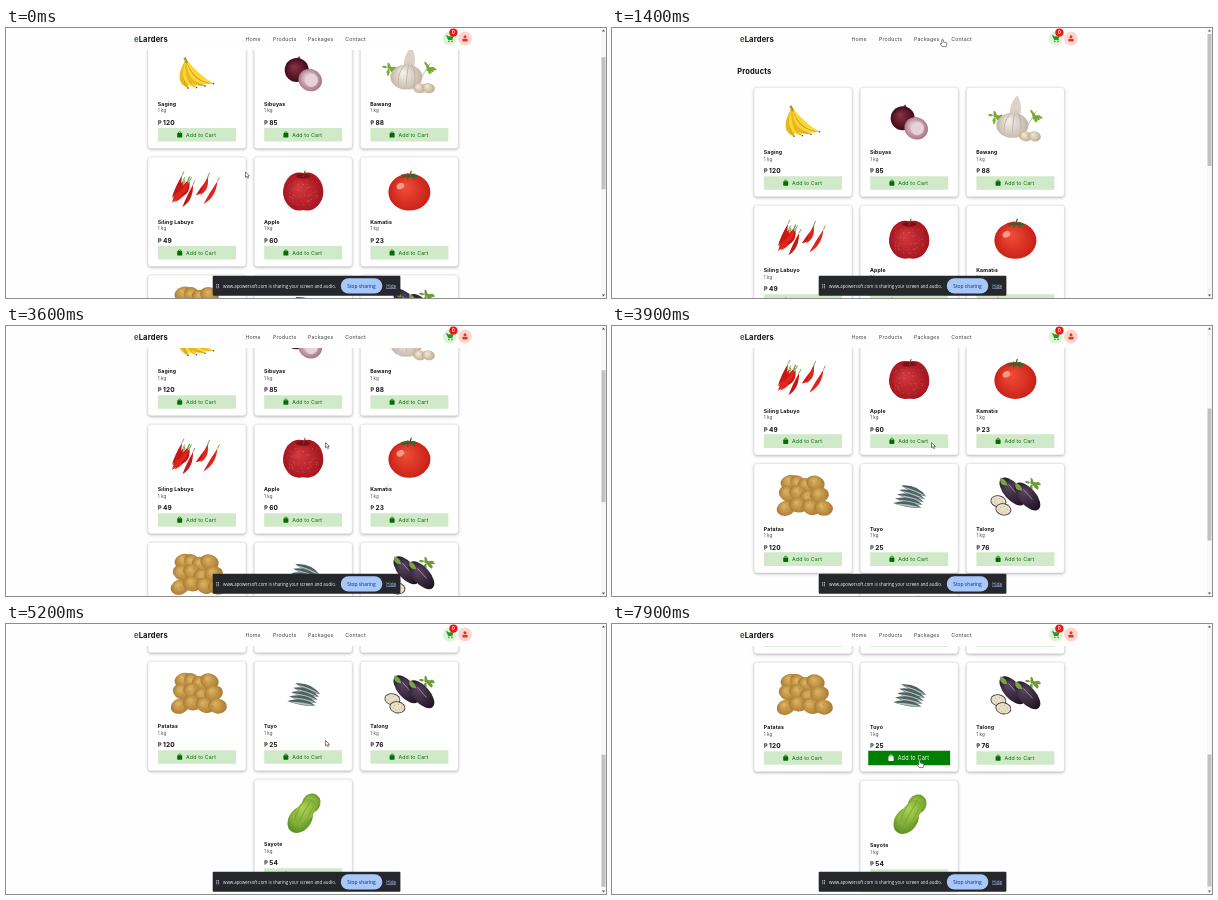
These frames come from a looping animation (600x270 px, 8 s). An HTML page with a canvas:

```html
<!DOCTYPE html>
<html lang="en">
<head>
<meta charset="utf-8">
<title>Grocery shop</title>
<style>
html, body { margin: 0; width: 100%; height: 100%; overflow: hidden; background: #fefefe; }
canvas { display: block; width: 600px; height: 270px; }
</style>
</head>
<body>
<canvas id="stage"></canvas>
<script>
const W = 600, H = 270, LOOP = 8000;
const canvas = document.getElementById('stage');
const dpr = window.devicePixelRatio || 1;
canvas.width = W * dpr;
canvas.height = H * dpr;
const g = canvas.getContext('2d');
const UI = 'Inter, sans-serif', SYS = '"Open Sans", sans-serif';
const INK = '#111', PAGE = '#fefefe', GREEN = '#0a800a';

// ---- timing ----

const clamp = v => Math.max(0, Math.min(1, v));
const smooth = v => v * v * (3 - 2 * v);
const easeOut = v => 1 - (1 - v) ** 3;
const span = (t, a, b) => clamp((t - a) / (b - a));

function scrollAt(t) {
  return 48.5 * (1 - easeOut(span(t, 0, 500)))
    + 157.5 * span(t, 3300, 3900)
    + 100.5 * easeOut(span(t, 3900, 4700))
    - span(t, 5600, 5700);
}

// Each move: start, end, target x, target y
const moves = [[150, 950, 330.5, 11], [1450, 2300, 255.5, 16.5],
  [3000, 3400, 319.5, 116.5], [7300, 7550, 307.5, 136]];

function cursorAt(t) {
  let x = 239.5, y = 144;
  for (const [a, b, tx, ty] of moves) {
    const k = smooth(span(t, a, b));
    x += (tx - x) * k;
    y += (ty - y) * k;
  }
  return [x, y];
}

// ---- drawing helpers ----

let seed = 1;
function rand(a, b) {
  seed = seed * 16807 % 2147483647;
  return a + (b - a) * seed / 2147483647;
}

function text(s, x, y, size, color, weight = 400, font = UI, align = 'left') {
  g.font = `${weight} ${size}px ${font}`;
  g.letterSpacing = font === UI ? '0.15px' : '0px';
  g.textAlign = align;
  g.fillStyle = color;
  g.fillText(s, x, y);
}

function rect(x, y, w, h, color, r = 0) {
  g.beginPath();
  g.roundRect(x, y, w, h, r);
  g.fillStyle = color;
  g.fill();
}

function oval(x, y, rx, ry, rot, color) {
  g.beginPath();
  g.ellipse(x, y, rx, ry, rot, 0, Math.PI * 2);
  g.fillStyle = color;
  g.fill();
}

const dot = (x, y, r, color) => oval(x, y, r, r, 0, color);

function ball(x, y, rx, ry, rot, light, dark) {
  const r = Math.max(rx, ry);
  const fill = g.createRadialGradient(x - r * .25, y - r * .3, 0, x, y, r);
  fill.addColorStop(0, light);
  fill.addColorStop(1, dark);
  oval(x, y, rx, ry, rot, fill);
}

// Tapered curved body between two points, bent towards (cx, cy)
function horn(x0, y0, cx, cy, x1, y1, w, color) {
  const len = Math.hypot(x1 - x0, y1 - y0);
  const nx = (y1 - y0) / len * w, ny = (x0 - x1) / len * w;
  g.beginPath();
  g.moveTo(x0, y0);
  g.quadraticCurveTo(cx + nx, cy + ny, x1, y1);
  g.quadraticCurveTo(cx - nx, cy - ny, x0, y0);
  g.fillStyle = color;
  g.fill();
}

function line(x0, y0, x1, y1, width, color) {
  g.beginPath();
  g.moveTo(x0, y0);
  g.lineTo(x1, y1);
  g.strokeStyle = color;
  g.lineWidth = width;
  g.stroke();
}

function outline(d, fill, stroke, width) {
  const path = new Path2D(d);
  g.fillStyle = fill;
  g.fill(path);
  if (!stroke) return;
  g.strokeStyle = stroke;
  g.lineWidth = width;
  g.stroke(path);
}

function leaves(x, y, n, r, color) {
  for (let i = 0; i < n; i++) {
    const a = rand(0, 6.3), d = rand(0, r);
    oval(x + Math.cos(a) * d, y + Math.sin(a) * d, 2.4, 1.1, a, color);
  }
}

// ---- produce, in card coordinates ----

function banana() {
  for (let i = 0; i < 4; i++) {
    const x = 40 + i * 8.5, y = 49 - i * i * .5;
    horn(38, 20, 33 + i * 4, 43, x, y, 9, i % 2 ? '#fbd636' : '#ebb91f');
    horn(38, 21, 33 + i * 4, 44, x, y, 1, '#c99a1b');
    dot(x, y, .8, '#5a4715');
  }
  line(36.5, 18.5, 39, 24, 2.4, '#b59425');
}

function onion() {
  horn(45, 17, 45, 21, 43, 27, 4, '#8c3c3f');
  ball(42.5, 31, 12, 12, 0, '#8b3444', '#3f0b18');
  ball(56, 41, 12, 11, .5, '#f0dfe4', '#a87487');
  oval(57, 41, 7, 7, .5, '#d8b9c5');
  oval(57, 41, 6.4, 6.4, .5, '#e6d2d9');
}

function garlic() {
  for (const side of [-1, 1]) {
    leaves(49 + side * 19, 29, 14, 6, '#74ab35');
    line(49 + side * 21, 24, 49 + side * 12, 38, .6, '#74ab35');
  }
  horn(51, 8, 49, 22, 47, 42, 11, '#dcd3c8');
  ball(46, 38, 16, 12.5, 0, '#f7f2ea', '#bfb3a5');
  for (let i = -1; i < 2; i++) horn(49, 22, 46 + i * 12, 34, 46 + i * 7, 49, .8, '#b9aca0');
  for (const x of [59, 68]) ball(x, 49, 6.5, 5, .2, '#f5eddc', '#bba98c');
}

function chili() {
  for (let i = 0; i < 12; i++) {
    const x = rand(34, 70), y = rand(17, 28);
    const ex = x + rand(-18, i % 3 ? -4 : 16), ey = rand(36, 50);
    line(x + 2, y - 4, x, y, .9, '#6d9c3c');
    horn(x, y, (x + ex) / 2 + 2, (y + ey) / 2 + 3, clampX(ex), ey, 4, i % 2 ? '#e0251d' : '#c31813');
  }
}

const clampX = x => Math.max(24, Math.min(74, x));

function apple() {
  for (const x of [45, 53]) ball(x, 34.5, 16, 19, 0, '#d43b3f', '#a3141f');
  ball(49, 36, 20, 17, 0, '#d43b3f', '#a3141f');
  oval(49, 19, 7, 2.4, 0, '#7e0f18');
  line(49, 20, 51, 13.5, 1, '#6a451f');
  for (let i = 0; i < 60; i++) dot(rand(35, 63), rand(24, 48), .35, '#e98079');
}

function tomato() {
  ball(49, 35, 21, 18.5, 0, '#f0503a', '#c81f16');
  for (let i = 0; i < 7; i++) {
    const a = i * .9, x = 49 + Math.cos(a) * 10, y = 19.5 + Math.sin(a) * 4;
    horn(49, 19, (49 + x) / 2, 18.5, x, y, 1.8, '#37642a');
  }
  line(49, 19, 51, 13.5, 1.2, '#37642a');
  oval(40, 29, 4, 3, -.5, '#f99a85');
}

function potatoes() {
  for (let row = 0; row < 3; row++)
    for (let i = 0; i < 4; i++) {
      const x = 34 + i * 10.5 + (row - 1) * (i - 1) * 2, y = 21 + row * 10.5 + rand(-2, 3);
      ball(x, y, 9.5, 7.5, rand(-.4, .9), '#dfb662', '#a87932');
      for (let k = 0; k < 3; k++) dot(x + rand(-5, 5), y + rand(-4, 4), .4, '#94682b');
    }
}

function fish() {
  for (let i = 0; i < 5; i++) {
    const x = 41 - i * 2, y = 22 + i * 4.4, ex = 66 - i * 1.2, ey = 33 + i * 2.8;
    const mx = (x + ex) / 2 + 1, my = (y + ey) / 2 - 2;
    horn(x, y, mx, my, ex, ey, 5.5, '#4d6163');
    horn(x, y + .8, mx, my + 2, ex, ey, 2, '#b5c0b9');
  }
}

function eggplant() {
  leaves(67, 20, 14, 6, '#6d9a38');
  for (let i = 0; i < 2; i++) {
    const x = 46 + i * 15, y = 28 + i * 5;
    ball(x, y, 17, 8.5, .85, '#5a4560', '#1d1220');
    horn(x - 12, y - 14, x - 10, y - 9, x - 5, y - 6, 5, '#7da348');
    line(x - 4, y - 7, x + 5, y + 3, 1, '#9a8aa0');
  }
  for (let i = 0; i < 2; i++) {
    const x = 32 + i * 5, y = 38 + i * 8;
    oval(x, y, 8, 6, .2, '#3d2440');
    oval(x, y, 7.2, 5.2, .2, '#e6e0c4');
    for (let k = 0; k < 6; k++) dot(x + Math.cos(k) * 4, y + Math.sin(k) * 3, .5, '#b1a572');
  }
}

function sayote() {
  ball(57, 24, 9, 10, .6, '#aed04f', '#699a2a');
  ball(46, 40, 15, 11, -.9, '#a9cd4c', '#588c24');
  ball(51, 32, 14, 8.5, -.95, '#b1d354', '#7cab34');
  for (let i = -1; i < 2; i++)
    horn(59 + i * 3, 18 + i * 3, 50 + i * 7, 31 + i * 4, 42 + i * 4, 48 + i, .7, '#6c9d2c');
}

const goods = [['Saging', 120, banana], ['Sibuyas', 85, onion], ['Bawang', 88, garlic],
  ['Siling Labuyo', 49, chili], ['Apple', 60, apple], ['Kamatis', 23, tomato],
  ['Patatas', 120, potatoes], ['Tuyo', 25, fish], ['Talong', 76, eggplant], ['Sayote', 54, sayote]];

// ---- page ----

function mix(a, b, k) {
  return `rgb(${a.map((v, i) => Math.round(v + (b[i] - v) * k))})`;
}

function button(hover) {
  const color = mix([0, 110, 0], [255, 255, 255], hover);
  g.save();
  g.translate(49, 95.7);
  g.scale(1 + .05 * hover, 1 + .05 * hover);
  rect(-39, -6.8, 78, 13.6, mix([208, 233, 200], [0, 128, 0], hover));
  rect(-19.8, -1.7, 5, 4.5, color, .7);
  g.beginPath();
  g.arc(-17.3, -1.6, 1.4, Math.PI, 0);
  g.strokeStyle = color;
  g.lineWidth = .7;
  g.stroke();
  text('Add to Cart', -11, 2, 5.25, color);
  g.restore();
}

function card(x, y, [name, price, art], hover) {
  g.save();
  g.translate(x, y);
  g.save();
  g.shadowColor = 'rgba(0,0,0,.3)';
  g.shadowBlur = 3 * dpr;
  g.shadowOffsetY = dpr;
  rect(0, 0, 98, 109.5, '#fff', 3);
  g.restore();
  g.strokeStyle = '#d9d9d9';
  g.lineWidth = .5;
  g.stroke();
  seed = 77;
  art();
  text(name, 9.8, 67.1, 5.2, INK, 700);
  text('1 kg', 9.8, 73.3, 4.4, '#444');
  text('₱', 9.8, 86.1, 5.8, '#333', 500);
  text(price, 15, 86.1, 6.5, INK, 700);
  button(hover);
  g.restore();
}

const links = [['Home', 239.5], ['Products', 267], ['Packages', 302], ['Contact', 339.3]];

function header() {
  rect(0, 0, 595, 22, PAGE);
  text('e', 128, 13.5, 7.6, GREEN, 700);
  text('Larders', 128 + g.measureText('e').width, 13.5, 7.6, INK, 700);
  for (const [label, x] of links) text(label, x, 12.7, 5.25, '#444');
  dot(443.6, 10.6, 7, '#dff2d8');
  outline('M440 7.2 L441.6 7.2 L442 8.2 L447.4 8.2 L446.4 12 L442.2 12Z', '#18a018');
  for (const x of [442.9, 446]) dot(x, 13.4, .8, '#18a018');
  dot(447.4, 4.6, 4.1, '#f01414');
  text('0', 447.4, 6.3, 4.7, '#fff', 600, UI, 'center');
  dot(459, 10.6, 7, '#fad6d0');
  dot(459, 8.8, 1.5, '#e23a22');
  rect(456.3, 10.8, 5.4, 2.6, '#e23a22', 1);
}

function scrollbar(scroll) {
  rect(595, 0, 5, H, '#f8f8f8');
  rect(595.5, 6 + scroll * .484, 4, 132, '#c1c1c1');
  for (const [base, tip] of [[3.6, 1.6], [266.4, 268.4]])
    outline(`M596 ${base} L597.5 ${tip} L599 ${base}Z`, '#505050');
}

function shareBar() {
  rect(206.7, 247.8, 187.7, 20, '#26272b', 1);
  for (let i = 0; i < 6; i++)
    rect(210.3 + i % 2 * 1.7, 256 + (i >> 1) * 1.6, .9, 1.1, '#c4c7cc');
  text('www.apowersoft.com is sharing your screen and audio.', 217, 259.6, 4.4, '#f0f0f0', 400, SYS);
  rect(334.8, 250.3, 41.5, 15.2, '#a8c7fa', 7.6);
  text('Stop sharing', 355.5, 259.6, 4.9, '#0b2f68', 500, SYS, 'center');
  text('Hide', 380.2, 259.6, 4.6, '#a8c7fa', 400, SYS);
  rect(380.2, 260.4, 9.8, .5, '#a8c7fa');
}

function statusBar() {
  rect(0, 262, 50, 8, '#2b2c2f', [0, 1, 0, 0]);
  text('localhost:3000/home#', 1.6, 267.7, 4.3, '#e6e6e6', 400, SYS);
}

const ARROW = 'M0 0 L0 5.4 L1.3 4.3 L2.2 6.2 L3.1 5.8 L2.3 4 L3.9 3.9Z';
const HAND = 'M-.7 .6 Q0 -.5 .7 .6 L.8 3 L3.7 3.6 Q4.6 4 4.4 5 L3.6 7.6 L-.4 7.6 L-2.4 4.8 Q-2.2 3.8 -.7 4.8Z';

function cursor(x, y, hand) {
  g.save();
  g.translate(x, y);
  outline(hand ? HAND : ARROW, '#fff', '#333', .6);
  g.restore();
}

function draw(t) {
  const scroll = scrollAt(t);
  const [x, y] = cursorAt(t);
  const hover = smooth(span(t, 7480, 7680));
  g.setTransform(dpr, 0, 0, dpr, 0, 0);
  rect(0, 0, W, H, PAGE);
  text('Products', 125.2, 46.3 - scroll, 7.5, INK, 700);
  goods.forEach((item, i) => {
    const col = i === 9 ? 1 : i % 3;
    const top = 59.3 + Math.floor(i / 3) * 118 - scroll;
    card(142 + col * 106.2, top, item, item[0] === 'Tuyo' ? hover : 0);
  });
  header();
  scrollbar(scroll);
  shareBar();
  if (t >= 2200 && t < 3200) statusBar();
  const onLink = y < 19 && links.some(([, left]) => x >= left && x < left + 31);
  cursor(x, y, onLink || hover > 0);
}

function tick() {
  draw(performance.now() % LOOP);
  requestAnimationFrame(tick);
}
tick();
</script>
</body>
</html>
```
